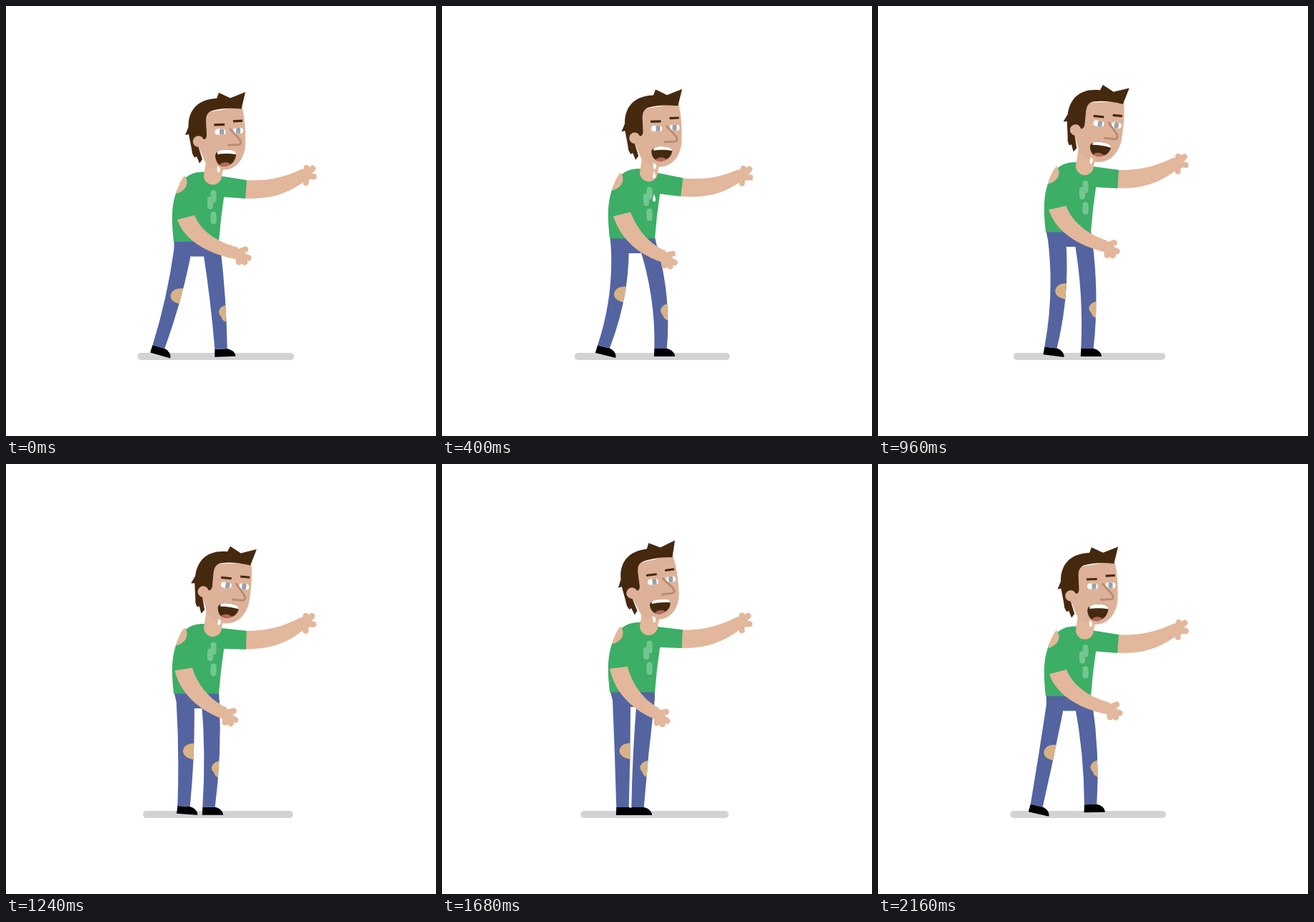
An HTML page that plays this animation: 600 px wide and 600 px high, repeating every 2.2 s.

```html
<!DOCTYPE html>
<html lang="en">
<head>
<meta charset="utf-8">
<title>Shambling walk</title>
<style>
html, body { margin: 0; width: 100%; height: 100%; overflow: hidden; background: #fff; }
svg { display: block; width: 100vw; height: 100vh; }
.jeans { fill: #5364a0; }
.shirt { fill: #3cae66; }
.skin { fill: #e2b79b; }
.face { fill: #ddb298; }
.hair { fill: #45290f; }
.tan { fill: #d8b285; }
.fingers { fill: none; stroke: #e2b79b; stroke-width: 8.2; stroke-linecap: round; }
.white { fill: #fff; }
.iris { fill: #98a2ab; }
</style>
</head>
<body>
<svg viewBox="0 0 600 600">
  <defs>
    <clipPath id="backClip"><path id="backShape"/></clipPath>
    <clipPath id="frontClip"><path id="frontShape"/></clipPath>
    <clipPath id="mouthClip"><path id="mouthShape" d="M292 208C293 203 299 200 308 200.500C317 200.500 322 203 321 208C320 216 315 222 306 224C297 225 292 217 292 208Z"/></clipPath>
  </defs>

  <rect id="ground" y="484" height="10" rx="5" fill="#d1d3d4"/>

  <path id="backShoe" d="M-8.700 0H8.700C14 1 20 5 20 11H-9.200Z"/>
  <path id="frontShoe" d="M-8.700 0H8.700C14 1 20 5 20 11H-9.200Z"/>
  <path id="pelvis" class="jeans"/>
  <path id="backLeg" class="jeans"/>
  <g clip-path="url(#backClip)"><path id="backPatch" class="tan" d="M4 -11C-6 -12 -14 -9 -15 -1C-15 6 -9 10 4 12Z"/></g>
  <path id="frontLeg" class="jeans"/>
  <g clip-path="url(#frontClip)"><path id="frontPatch" class="tan" d="M5 -11C-4 -12 -10 -6 -10 -1C-9 4 -7 4 -6.500 6C-5 11 -1 13 5 13Z"/></g>

  <g id="body">
    <g id="farArm">
      <path class="skin" d="M333 243C368 245 390 238 414 227L421 241C395 262 370 270 333 268.500Z"/>
      <circle class="skin" cx="419" cy="236" r="8"/>
      <path class="fingers" d="M418 235L419.500 226M420 235L428 226.500M420 237L429.500 238M417 239L418.500 246.500"/>
      <path class="shirt" d="M285 235L301 237.500L336 243L334 268.700L285 265Z"/>
    </g>
    <path class="shirt" d="M234 329C231 300 230 278 239 256C245 242 256 231 276 231.500L301 237L308 250L304 267L300 297L297 329Z"/>
    <path d="M261 249C269 257 271 262 267 272L263 291" fill="none" stroke="#48a568" stroke-width=".8" opacity=".7"/>
    <path class="skin" d="M249 237C254 242 254 252 247 257C243 260.500 240 261 237.300 262C240 252 243 244 249 237Z"/>
    <g fill="#73c68f">
      <rect x="285.500" y="257" width="8" height="17.500" rx="4"/>
      <rect x="281" y="266" width="8" height="17.500" rx="4"/>
      <rect x="285.500" y="287" width="8" height="17.500" rx="4"/>
    </g>
    <path class="skin" d="M280 210L305 218L301 237A12.400 12.400 0 0 1 276 237Z"/>

    <g id="head">
      <path class="face" d="M271 150L329 140C333 154 334.500 172 334 194C333 212 322 228 305 228.500C298 229 288 227 279 220L268 195Z"/>
      <path class="hair" d="M250 180L254.500 169C254 146 267 130 294 129L297 121L313 128.500L334 120L328.500 143.500C312 142 299 143 288 146C281 148 279 153 279 161L280 180C280 187 274 188 273 183L268 195L274 214L270 219.500L266 210L263 211.500L260 206C259 198 257 190 255 179Z"/>
      <circle class="face" cx="268.500" cy="189" r="7.700"/>
      <g class="hair">
        <path d="M290.200 164.300L305 163.700V166.900L290.500 167.500ZM316.800 159.300L330 158.600V161.700L317 162.400Z"/>
      </g>
      <g class="white">
        <rect x="291.500" y="171.500" width="15" height="8" rx="4"/>
        <rect x="317" y="170" width="14" height="8" rx="4"/>
      </g>
      <rect class="iris" x="298" y="171.500" width="6" height="8" rx="1.500"/>
      <rect class="iris" x="321" y="170" width="6" height="8" rx="1.500"/>
      <path d="M313 172L326 186C329 191 328 193.500 323 193.500L310.500 194" fill="none" stroke="#b98c75" stroke-width="3" stroke-linecap="round" stroke-linejoin="round"/>
      <g id="mouth">
        <path class="hair" d="M292 208C293 203 299 200 308 200.500C317 200.500 322 203 321 208C320 216 315 222 306 224C297 225 292 217 292 208Z"/>
        <g clip-path="url(#mouthClip)">
          <path class="white" d="M295 198H323V207.500C314 205.500 303 205.500 295 207Z"/>
          <ellipse cx="306" cy="225" rx="9" ry="7" fill="#b7685b"/>
        </g>
      </g>
      <path class="white" d="M294.500 223L299 226L298.500 230C298 233 295 233 294.700 230Z"/>
    </g>
  </g>

  <g id="drops"></g>

  <g id="nearArm">
    <path id="forearm" class="skin"/>
    <g id="nearHand">
      <circle class="skin" cx="326" cy="346.500" r="8"/>
      <path class="fingers" d="M324 344L334 339.500M327 347L338.500 351.500M326 348L333 357.500M324 348L325 357.500"/>
    </g>
  </g>
</svg>
<script>
const LOOP = 2200;
const TIMES = [0, 400, 720, 960, 1240, 1680, 1900, 2160];
const TRACKS = {
  lift:       [0, -4.5, -12, -13.5, -8.5, -10.5, -14.5, -5],
  head:       [0, 0.5, 5, 8.6, 8.1, -4.4, -3, 0.5],
  jaw:        [1, 0.87, 0.83, 0.87, 0.87, 0.87, 0.9, 1],
  reach:      [0, 2.6, -1, -1.2, -2.6, -1.9, -1, 0],
  sleeve:     [0, 0, 0, 1, 5, 7, 4, 0],
  swing:      [0, 8, 0, 3, 10.5, 13.5, 8, 0.7],
  backX:      [213, 225.5, 234.5, 241, 248, 252, 244, 221.5],
  backY:      [475.5, 475.5, 475.2, 476.5, 477.5, 479, 478.5, 476.5],
  backTilt:   [16, 14, 12, 7, 4, 0, 3, 13],
  backBend:   [3, 7, 7, 6, 2, 0.5, 1, 0.5],
  frontX:     [300, 305, 298.5, 292, 283, 273, 278, 296.5],
  frontY:     [478.5, 478, 477.7, 478, 478.7, 479, 475, 475],
  frontTilt:  [-2, 0, 0, 0, 0, 0, 1, -1],
  frontBend:  [1.5, 6.5, 6.5, 4.5, 3, -1, 4, 3.5],
  groundLeft: [183.5, 185, 187, 189, 191, 193.5, 191, 184.5]
};
const DROPS = [124, 251];
const FALL = 0.0006;
const SHOULDER = [252, 258];

const $ = id => document.getElementById(id);
const set = (id, name, value) => $(id).setAttribute(name, value);
const pt = p => p.map(v => v.toFixed(2)).join(' ');

// Cyclic cubic interpolation that never overshoots a key.
function sample(values, t) {
  const n = TIMES.length;
  const wrap = i => (i + n) % n;
  const gap = i => (TIMES[wrap(i + 1)] - TIMES[wrap(i)] + LOOP) % LOOP;
  const slope = i => (values[wrap(i + 1)] - values[wrap(i)]) / gap(i);
  const tangent = i => {
    const a = slope(i - 1), b = slope(i);
    return a * b <= 0 ? 0 : 2 * a * b / (a + b);
  };
  let i = n - 1;
  while (TIMES[i] > t) i--;
  const h = gap(i), u = (t - TIMES[i]) / h, v = 1 - u;
  return values[i] * (1 + 2 * u) * v * v + tangent(i) * h * u * v * v
    + values[wrap(i + 1)] * u * u * (3 - 2 * u) - tangent(i + 1) * h * u * u * v;
}

function turn([x, y], degrees, [cx, cy] = SHOULDER) {
  const a = degrees * Math.PI / 180, c = Math.cos(a), s = Math.sin(a);
  return [cx + (x - cx) * c - (y - cy) * s, cy + (x - cx) * s + (y - cy) * c];
}

function drawLeg(name, hip, ankle, tilt, bend, patchAt) {
  const knee = [(hip[0] + ankle[0]) / 2 + 2 * bend, (hip[1] + ankle[1]) / 2];
  const edge = side => [
    [hip[0] + 12.5 * side, hip[1]],
    [knee[0] + 11 * side, knee[1]],
    turn([ankle[0] + 8.7 * side, ankle[1]], tilt, ankle)
  ];
  const left = edge(-1), right = edge(1);
  const d = `M${pt(left[0])}Q${pt(left[1])} ${pt(left[2])}L${pt(right[2])}Q${pt(right[1])} ${pt(right[0])}Z`;
  set(name + 'Leg', 'd', d);
  set(name + 'Shape', 'd', d);
  set(name + 'Shoe', 'transform', `translate(${pt(ankle)}) rotate(${tilt})`);
  const u = patchAt, v = 1 - u;
  const spot = [0, 1].map(k => v * v * right[0][k] + 2 * u * v * right[1][k] + u * u * right[2][k]);
  set(name + 'Patch', 'transform', `translate(${pt(spot)})`);
}

function drawNearArm(sleeve, swing) {
  const s = p => pt(turn(p, sleeve)), w = p => pt(turn(p, swing));
  set('forearm', 'd', `M${s([239, 298])}C${s([249, 328])} ${w([284, 347])} ${w([322, 353.5])}`
    + `L${w([324, 337])}C${w([300, 331])} ${s([273, 317])} ${s([263, 292])}Z`);
  set('nearHand', 'transform', `rotate(${swing} ${pt(SHOULDER)})`);
}

function drawDrops(t) {
  DROPS.forEach((start, i) => {
    const y = 222 + FALL * (t - start) ** 2;
    const drop = $('drops').children[i];
    drop.setAttribute('transform', `translate(296 ${y})`);
    drop.setAttribute('visibility', t > start && y < 484 ? 'visible' : 'hidden');
  });
}

function draw(t) {
  const p = {};
  for (const key in TRACKS) p[key] = sample(TRACKS[key], t);

  set('ground', 'x', p.groundLeft);
  set('ground', 'width', 402 - (p.groundLeft - 183.5) * 0.2 - p.groundLeft);

  const hipY = 339 + p.lift;
  const backHip = [247 + (p.backX - 213) * 0.09, hipY];
  const frontHip = [287 + (p.frontX - 300) * 0.1, hipY];
  drawLeg('back', backHip, [p.backX, p.backY], p.backTilt, p.backBend, 0.48);
  drawLeg('front', frontHip, [p.frontX, p.frontY], p.frontTilt, p.frontBend, 0.64);
  const waist = hipY - 12, crotch = hipY + 10.5;
  set('pelvis', 'd', `M234.5 ${waist}H297L${frontHip[0] + 12.5} ${hipY + 1}L${frontHip[0] - 11.5} ${crotch}`
    + `H${backHip[0] + 12}L${backHip[0] - 12.5} ${hipY + 1}Z`);

  set('body', 'transform', `translate(0 ${p.lift})`);
  set('nearArm', 'transform', `translate(0 ${p.lift})`);
  set('farArm', 'transform', `rotate(${p.reach} 300 250)`);
  set('head', 'transform', `rotate(${p.head} 289 235)`);
  set('mouth', 'transform', `translate(0 200.5) scale(1 ${p.jaw}) translate(0 -200.5)`);
  drawNearArm(p.sleeve, p.swing);
  drawDrops(t);
}

$('drops').innerHTML = DROPS.map(() => '<path class="white" d="M0 -6C1 -2 2 0 2 2.500A2 2.500 0 0 1 -2 2.500C-2 0 -1 -2 0 -6Z"/>').join('');

const begin = performance.now();
function tick() {
  draw((performance.now() - begin) % LOOP);
  requestAnimationFrame(tick);
}
draw(0);
requestAnimationFrame(tick);
</script>
</body>
</html>
```
